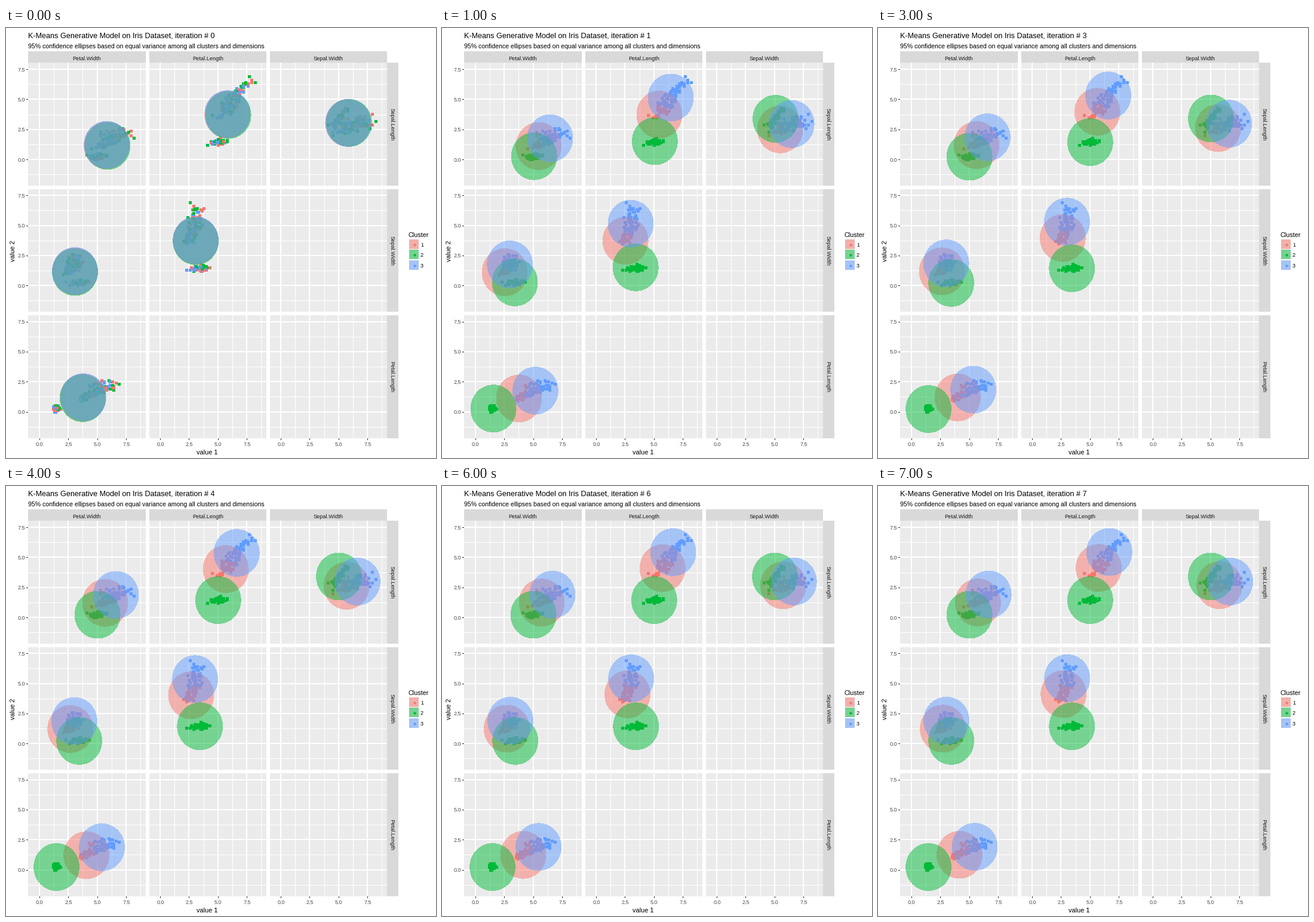
Animation of 720x720 px, one loop 8000 ms. Source, as a matplotlib script:

```python
import numpy as np
import matplotlib.pyplot as plt
from matplotlib.animation import FuncAnimation
from matplotlib.patches import Rectangle

plt.rcParams["font.family"] = "Liberation Sans"

SIZE, DPI = 720, 72
COLORS = np.array(["#F8766D", "#00BA38", "#619CFF"])
RADIUS = 1.96
X_SCALE, Y_SCALE = 19.35, 20.13
X_ZERO, Y_ZERO = 56.3, 220.5
X_PITCH, Y_PITCH = 202.15, 211.25
LEFTS, RIGHTS = [37, 240, 442], [234, 436, 638]
TOPS, BOTTOMS = [58, 270, 481], [264, 475, 687]

# variable order: sepal length, sepal width, petal length, petal width
NAMES = ["Sepal.Length", "Sepal.Width", "Petal.Length", "Petal.Width"]
ROW_VARS, COL_VARS = [0, 1, 2], [3, 2, 1]
PANELS = [(r, c) for r in range(3) for c in range(3 - r) if (r, c) != (0, 3)]

# cluster centres: nearly equal at first, then easing from FIRST to LAST
GRAND_MEAN = np.array([5.84, 3.06, 3.76, 1.20])
START = GRAND_MEAN + np.outer([-1, 0, 0], [.04, 0, 0, 0]) \
    + np.outer([0, -1, 0.7], [-.04, 0, .04, .05])
FIRST = np.array([(5.45, 2.52, 3.75, 1.13),
                  (5.06, 3.40, 1.54, 0.29),
                  (6.44, 2.97, 5.17, 1.78)])
LAST = np.array([(5.77, 2.72, 4.18, 1.28),
                 (5.006, 3.428, 1.462, 0.246),
                 (6.69, 3.02, 5.50, 1.95)])
DECAY = np.array([0.68, 0.0, 0.7])

rng = np.random.default_rng(12)


def grow(mean, sd, corr, count=50):
    """Flowers whose measures share one size factor with the given correlation."""
    u = np.linspace(-1, 1, count)[:, None]
    size = 2.1 * np.sign(u) * np.abs(u) ** 1.5
    noise = np.clip(rng.normal(size=(count, 4)), -1.9, 1.9)
    corr = np.array(corr)
    dev = corr * size + np.sqrt(1 - corr ** 2) * noise
    return np.round(mean + dev * sd, 1)


flowers = np.vstack([
    grow((5.01, 3.43, 1.46, 0.25), (.35, .38, .17, .11), (.85, .85, .3, .3)),
    grow((5.94, 2.77, 4.26, 1.33), (.52, .31, .47, .20), (.82, .7, .9, .85)),
    grow((6.59, 2.97, 5.55, 2.03), (.64, .32, .55, .27), (.95, .48, .9, .35)),
    [(7.9, 3.8, 6.4, 2.0), (7.7, 2.6, 6.9, 2.3), (4.5, 2.3, 1.3, 0.3)],
])
first_labels = rng.integers(0, 3, len(flowers))


def centers(step):
    if step == 0:
        return START
    return LAST + (FIRST - LAST) * (DECAY ** (step - 1))[:, None]


def labels(step):
    if step == 0:
        return first_labels
    gaps = flowers[:, None, :] - centers(max(step - 1, 1))
    return (gaps ** 2).sum(axis=2).argmin(axis=1)


def to_px(x, y, row, col):
    return (X_ZERO + X_PITCH * col + X_SCALE * x,
            Y_ZERO + Y_PITCH * row - Y_SCALE * y)


fig = plt.figure(figsize=(SIZE / DPI, SIZE / DPI), dpi=DPI, facecolor="white")
ax = fig.add_axes([0, 0, 1, 1])
ax.set(xlim=(0, SIZE), ylim=(SIZE, 0))
ax.axis("off")


def box(x0, y0, x1, y1, color, z=0, alpha=None):
    ax.add_patch(Rectangle((x0, y0), x1 - x0, y1 - y0, fc=color, lw=0,
                           alpha=alpha, zorder=z, antialiased=False))


def hline(y, x0, x1, color, width=1):
    end = np.floor(y) + 1
    box(x0, end - width, x1, end, color, 1)


def vline(x, y0, y1, color, width=1):
    end = np.floor(x) + 1
    box(end - width, y0, end, y1, color, 1)


def label(x, y, text, size, color="black", ha="center", va="center", rot=0):
    return ax.text(x, y, text, fontsize=size, color=color, ha=ha, va=va,
                   rotation=rot, zorder=6)


def draw_panel(row, col):
    x0, x1, y0, y1 = LEFTS[col], RIGHTS[col], TOPS[row], BOTTOMS[row]
    box(x0, y0, x1, y1, "#EBEBEB")
    for i in range(-1, 8):
        width = 1 if i % 2 else 2
        px, py = to_px(i * 1.25, i * 1.25, row, col)
        if x0 < px < x1:
            vline(px, y0, y1, "white", width)
        if y0 < py < y1:
            hline(py, x0, x1, "white", width)


for r in range(3):
    for c in range(3):
        draw_panel(r, c)

for k in range(3):
    box(LEFTS[k], 39, RIGHTS[k], 58, "#D9D9D9")
    box(638, TOPS[k], 657, BOTTOMS[k], "#D9D9D9")
    label((LEFTS[k] + RIGHTS[k]) / 2, 51, NAMES[COL_VARS[k]], 9.2, "#1A1A1A")
    label(646, (TOPS[k] + BOTTOMS[k]) / 2, NAMES[ROW_VARS[k]], 9.2, "#1A1A1A",
          rot=270)
    for tick in np.arange(0, 10, 2.5):
        px, py = to_px(tick, tick, k, k)
        vline(px, 687, 690, "#333333")
        hline(py, 34, 37, "#333333")
        label(px, 697.5, f"{tick:.1f}", 9, "#4D4D4D")
        label(32.5, py + 0.5, f"{tick:.1f}", 9, "#4D4D4D", ha="right")

title = label(37, 17, "", 12.65, ha="left", va="baseline")
label(37, 34, "95% confidence ellipses based on equal variance among all "
      "clusters and dimensions", 10.5, ha="left", va="baseline")
label(337, 711.5, "value 1", 11)
label(12, 373, "value 2", 11, rot=90)


def dots(xs, ys, color):
    return ax.scatter(xs, ys, s=4.4 ** 2, c=color, lw=0, zorder=3,
                      antialiased=False)


label(674, 350, "Cluster", 10.8, ha="left", va="baseline")
for k, color in enumerate(COLORS):
    top = round(354 + 17.28 * k)
    box(675, top, 691, top + 16, "#EBEBEB")
    box(675, top, 691, top + 16, color, 4, 0.5)
    dots([683.5], [top + 8.5], color)
    label(694, top + 9.5, str(k + 1), 9, ha="left")

spots = np.hstack([to_px(flowers[:, ROW_VARS[r]], flowers[:, COL_VARS[c]], r, c)
                   for r, c in PANELS])
marks = dots(*(np.floor(spots) + 0.5), "black")

turn = np.linspace(0, 2 * np.pi, 52)
ring_x, ring_y = RADIUS * np.cos(turn), RADIUS * np.sin(turn)
discs = [[ax.fill(ring_x, ring_y, color=color, alpha=0.5, lw=0, zorder=4,
                  antialiased=False)[0] for _ in PANELS] for color in COLORS]


def update(step):
    title.set_text(f"K-Means Generative Model on Iris Dataset, iteration # {step}")
    marks.set_facecolor(np.tile(COLORS[labels(step)], len(PANELS)))
    for mid, group in zip(centers(step), discs):
        for disc, (row, col) in zip(group, PANELS):
            a, b = ROW_VARS[row], COL_VARS[col]
            disc.set_xy(np.column_stack(
                to_px(mid[a] + ring_x, mid[b] + ring_y, row, col)))
    return [title, marks, *sum(discs, [])]


anim = FuncAnimation(fig, update, frames=8, interval=1000, repeat=True,
                     repeat_delay=0)
plt.show()
```
